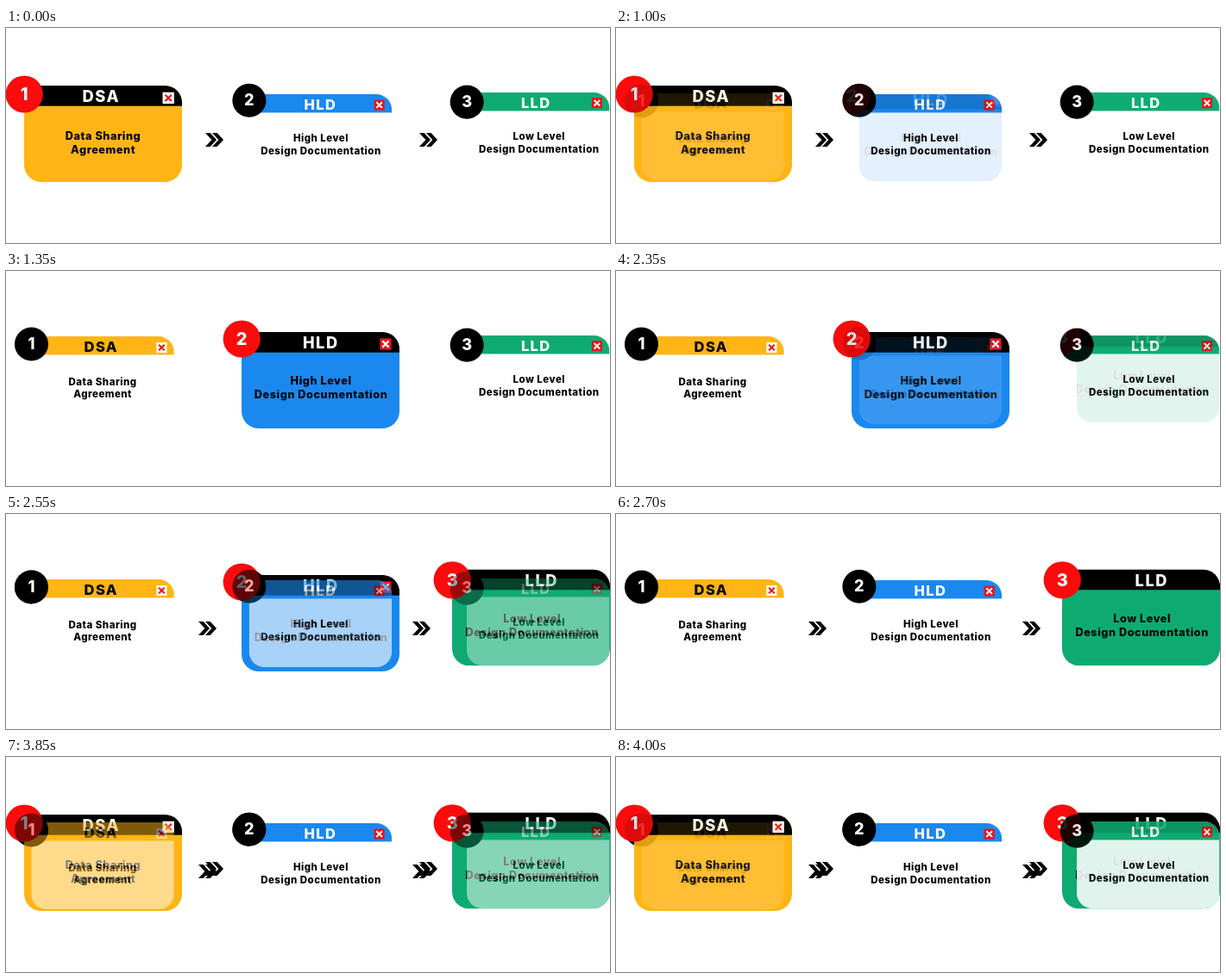
An HTML page with a canvas that plays this animation: 700x250 px, repeating every 4.05 s.

```html
<!DOCTYPE html>
<html lang="en">
<head>
<meta charset="utf-8">
<title>DSA, HLD, LLD</title>
<style>
  html, body { margin: 0; width: 100%; height: 100%; overflow: hidden; background: #fff; }
  canvas { display: block; }
</style>
</head>
<body>
<canvas id="stage" width="700" height="250"></canvas>
<script>
const W = 700, H = 250;
const LOOP = 4050, STEP = 50, STEPS = 8;
const FADES = [1000, 2350, 3700];
const SMALL = 0.904;
const RED = '#fb0b0c', BOX_RED = '#e8141b';

// Offsets are in the units of the enlarged card, from its top left corner.
const CARDS = [
  { title: 'DSA', lines: ['Data Sharing', 'Agreement'], color: '#ffb515', smallInk: '#000',
    big: [21, 67], small: [29.3, 76], badgeY: 10, titleX: [88.5, 88.8], textX: 91.3, textY: 58.2,
    box: [160.5, 7.7], boxFill: '#fff', boxInk: BOX_RED },
  { title: 'HLD', lines: ['High Level', 'Design Documentation'], color: '#1a88ee', smallInk: '#fff',
    big: [273, 71], small: [281.7, 77], badgeY: 8, titleX: [91, 90.7], textX: 91.8, textY: 56.3,
    box: [160.3, 7.3], boxFill: BOX_RED, boxInk: '#fff' },
  { title: 'LLD', lines: ['Low Level', 'Design Documentation'], color: '#0dab71', smallInk: '#fff',
    big: [517, 64.5], small: [534, 75], badgeY: 12.3, titleX: [103, 88], textX: 92.4, textY: 56.7,
    box: [160.3, 6.8], boxFill: BOX_RED, boxInk: '#fff', boxOnlySmall: true }
];

// Arrow positions for each state; the middle one has none.
const ARROWS = [
  [[231, 122], [479, 122]],
  [],
  [[223, 125], [471, 125]]
];

function label(c, str, x, y, size, fill, spacing = 0) {
  c.font = `800 ${size}px Inter, sans-serif`;
  c.letterSpacing = `${spacing}px`;
  c.textAlign = 'center';
  c.fillStyle = fill;
  c.fillText(str, x + spacing / 2, y + size * 0.364);
}

function drawBox(c, card) {
  const [x, y] = card.box;
  c.fillStyle = card.boxFill;
  c.fillRect(x, y, 13.3, 13.3);
  c.strokeStyle = card.boxInk;
  c.lineWidth = 2.2;
  c.beginPath();
  c.moveTo(x + 3, y + 3);
  c.lineTo(x + 10.3, y + 10.3);
  c.moveTo(x + 10.3, y + 3);
  c.lineTo(x + 3, y + 10.3);
  c.stroke();
}

function drawCard(c, card, number, active) {
  c.save();
  c.translate(...(active ? card.big : card.small));
  if (!active) c.scale(SMALL, SMALL);

  c.save();
  c.beginPath();
  c.roundRect(0, 0, 183, 112, [0, 20, 20, 20]);
  c.clip();
  c.fillStyle = active ? card.color : '#fff';
  c.fillRect(0, 0, 183, 112);
  c.fillStyle = active ? '#000' : card.color;
  c.fillRect(0, 0, 183, 23.7);
  c.restore();

  label(c, card.title, card.titleX[active ? 0 : 1], 12.8, 18.3, active ? '#fff' : card.smallInk, 1.5);
  card.lines.forEach((line, i) => label(c, line, card.textX, card.textY + 16 * i, 12.7, '#000', 0.55));
  if (!(active && card.boxOnlySmall)) drawBox(c, card);

  c.fillStyle = active ? RED : '#000';
  c.beginPath();
  c.arc(0.2, card.badgeY, 21.6, 0, Math.PI * 2);
  c.fill();
  label(c, number, 0.2, card.badgeY - 0.5, 20, '#fff');
  c.restore();
}

function drawArrow(c, [x, y]) {
  c.fillStyle = '#000';
  for (const dx of [0, 8]) {
    c.beginPath();
    [[0, 0], [5.6, 0], [13, 8], [5.6, 16], [0, 16], [7.4, 8]]
      .forEach(([px, py]) => c.lineTo(x + dx + px, y + py));
    c.fill();
  }
}

function makeState(active) {
  const layer = document.createElement('canvas');
  layer.width = W;
  layer.height = H;
  const c = layer.getContext('2d');
  CARDS.forEach((card, i) => drawCard(c, card, String(i + 1), i === active));
  ARROWS[active].forEach(pos => drawArrow(c, pos));
  return layer;
}

const states = CARDS.map((_, i) => makeState(i));
const ctx = document.getElementById('stage').getContext('2d');

function paint(mode, alpha, layer) {
  ctx.globalCompositeOperation = mode;
  ctx.globalAlpha = alpha;
  ctx.drawImage(layer, 0, 0);
}

// Shared areas blend; areas only in the next state pop in halfway,
// areas only in the old state stay until the fade is over.
function render(time) {
  const t = time % LOOP;
  let from = 0, k = 0;
  FADES.forEach((start, i) => {
    if (t < start) return;
    from = i;
    k = Math.floor((t - start) / STEP) + 1;
  });
  const to = (from + 1) % states.length;
  if (k >= STEPS) {
    from = to;
    k = 0;
  }

  ctx.clearRect(0, 0, W, H);
  paint('source-over', 1, states[from]);
  if (!k) return;
  paint('source-atop', k / STEPS, states[to]);
  if (k * 2 >= STEPS) paint('destination-over', 1, states[to]);
}

const begin = performance.now();
function tick() {
  render(performance.now() - begin);
  requestAnimationFrame(tick);
}
tick();
</script>
</body>
</html>
```
